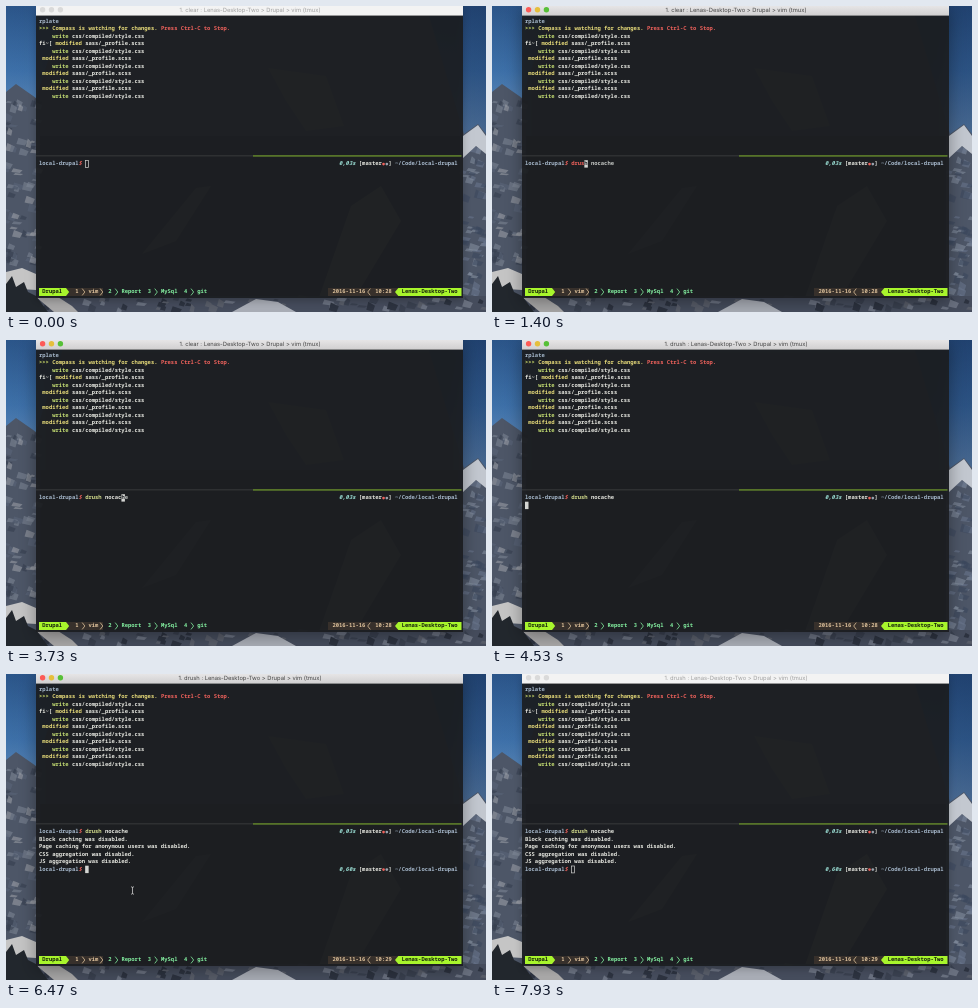
Animation, 480 px wide and 306 px high, one loop 7.99 s. Source, as an HTML page with a canvas:

```html
<!DOCTYPE html>
<html>
<head>
<meta charset="utf-8">
<style>
html, body { margin: 0; width: 100%; height: 100%; overflow: hidden; background: #1b1c20; }
canvas { display: block; width: 480px; height: 306px; }
</style>
</head>
<body>
<canvas id="stage"></canvas>
<script>
const LOOP = 7990, CW = 3.297, LEFT = 33, ROW = 7.5;
const HOST = 'Lenas-Desktop-Two';
const WHITE = '#e6e7e0', LIME = '#a8f52c', MINT = '#83efa0', TAN = '#dcc09a',
      YELLOW = '#e8dc7a', RED = '#f0625c', BLUE = '#a6b8cb', CYAN = '#9ce0d6';
const canvas = document.getElementById('stage');
const ctx = canvas.getContext('2d');
const ratio = window.devicePixelRatio || 1;
canvas.width = 480 * ratio;
canvas.height = 306 * ratio;

const colX = col => LEFT + col * CW;
const rowY = row => 15.4 + row * ROW;

function rect(x, y, w, h, color) {
  ctx.fillStyle = color;
  ctx.fillRect(x, y, w, h);
}

function poly(color, ...p) {
  ctx.fillStyle = color;
  ctx.beginPath();
  for (let i = 0; i < p.length; i += 2) ctx.lineTo(p[i], p[i + 1]);
  ctx.fill();
}

function gradient(x1, y1, ...colors) {
  const g = ctx.createLinearGradient(0, 0, x1, y1);
  colors.forEach((c, i) => g.addColorStop(i / (colors.length - 1), c));
  return g;
}

// Writes text on the terminal grid and returns the next column.
function put(col, row, text, color = WHITE, style = '600') {
  ctx.font = style + ' 5.495px "Noto Sans Mono", "DejaVu Sans Mono", monospace';
  ctx.textAlign = 'left';
  ctx.fillStyle = color;
  ctx.fillText(text, colX(col), rowY(row));
  return col + text.length;
}

function seeded(seed) {
  return () => (seed = (seed * 16807) % 2147483647) / 2147483647;
}

const rnd = seeded(41);

// Scatters soft rock facets over a box.
function rocks(count, x, y, w, h, tones) {
  for (let i = 0; i < count; i++) {
    const px = x + rnd() * w, py = y + rnd() * h;
    const dx = 3 + rnd() * 7, dy = 2 + rnd() * 8;
    poly(tones[i % tones.length], px, py, px + dx, py + dy * 0.4, px + dx * 0.7, py + dy, px - 2, py + dy * 0.8);
  }
}

function wallpaper() {
  rect(0, 0, 480, 306, gradient(0, 130, '#2b5589', '#3d70a9', '#6d95bf'));
  rect(0, 0, 480, 130, gradient(480, 0, 'rgba(16,36,72,0)', 'rgba(16,36,72,.4)'));
  // mountain side and its brighter faces
  poly('#4d5667', 0, 86, 10, 78, 30, 92, 60, 0, 420, 0, 458, 128, 472, 118, 480, 128, 480, 306, 0, 306);
  rect(34, 130, 420, 176, '#33363d');
  poly('#777468', 262, 62, 320, 70, 338, 120, 300, 125, 280, 95);
  poly('#6a675f', 136, 248, 190, 182, 205, 180, 170, 235);
  poly('#777468', 310, 300, 345, 200, 375, 180, 395, 215, 350, 290);
  rocks(70, -3, 90, 34, 165, ['#8089988c', '#333c4c8c', '#a0a4ab8c', '#5b667a8c']);
  rocks(55, 455, 136, 24, 160, ['#8791a28c', '#3b475d8c', '#6b788f8c']);
  poly('#c3c8d0', 457, 130, 472, 119, 480, 130, 480, 148, 470, 140, 457, 152);
  rect(30, 290, 450, 16, '#454c5c');
  rocks(60, 30, 289, 450, 13, ['#2c323f', '#69707f', '#39404f', '#575c68']);
  poly('#a9a8a8', 30, 291, 52, 291, 66, 300, 72, 306, 48, 306);
  poly('#a9adb6', 226, 306, 250, 293, 272, 296, 290, 306);
  // snow bank and trees in the corner
  poly('#c5c5c5', 0, 266, 16, 262, 30, 268, 30, 284, 0, 282);
  poly('#22272d', 0, 278, 6, 270, 10, 281, 18, 276, 22, 286, 30, 290, 42, 306, 0, 306);
}

function titleBar(focused, command) {
  rect(30, 0, 427, 9.6, focused ? gradient(0, 9.6, '#e6e5e6', '#d0cfd0') : '#f3f3f3');
  rect(30, 9.4, 427, 0.4, '#8a8a8a');
  const lights = focused ? ['#fc5b57', '#e5bf3c', '#57c038'] : ['#dadada', '#dadada', '#dadada'];
  lights.forEach((color, i) => {
    ctx.fillStyle = color;
    ctx.beginPath();
    ctx.arc(36.6 + i * 8.9, 3.8, 2.7, 0, 7);
    ctx.fill();
  });
  ctx.font = '5.8px Inter, Roboto, sans-serif';
  ctx.textAlign = 'center';
  ctx.fillStyle = focused ? '#454545' : '#a0a0a0';
  ctx.fillText(`1. ${command} : ${HOST} > Drupal > vim (tmux)`, 244, 4.4);
}

function compassPane() {
  put(0, 0, 'rplate', BLUE);
  put(0, 1, '>>>', '#d3e36c');
  put(4, 1, 'Compass is watching for changes.', YELLOW);
  put(37, 1, 'Press Ctrl-C to Stop.', RED);
  for (let row = 2; row <= 10; row++) {
    if (row % 2 === 0) {
      put(4, row, 'write', '#c3dc72');
      put(10, row, 'css/compiled/style.css');
    } else {
      const col = row === 3 ? 5 : 1;
      if (row === 3) put(0, row, 'fi~[');
      put(col, row, 'modified', YELLOW, '700');
      put(col + 9, row, 'sass/_profile.scss');
    }
  }
  rect(30, 149.6, 217, 0.6, '#4a4b4d');
  rect(247, 149.5, 208.5, 0.9, '#8fc732');
}

function prompt(row, seconds) {
  put(0, row, 'local-drupal', BLUE);
  put(12, row, '$', RED, 'italic 700');
  put(91, row, seconds, CYAN, 'italic 700');
  put(97, row, '[master', WHITE, '700');
  [RED, '#9aa3ae'].forEach((color, i) => {
    ctx.fillStyle = color;
    ctx.beginPath();
    ctx.arc(colX(104.5 + i), rowY(row) + 0.2, 1.35, 0, 7);
    ctx.fill();
  });
  put(106, row, ']', WHITE, '700');
  put(108, row, '~/Code/local-drupal', BLUE);
}

function cursor(col, row, focused, under = '') {
  const x = colX(col), y = rowY(row) - 3.7;
  if (!focused) {
    ctx.strokeStyle = '#d0d0ce';
    ctx.lineWidth = 0.7;
    ctx.strokeRect(x + 0.2, y + 0.3, CW - 0.2, 6.9);
    return;
  }
  rect(x, y, CW + 0.2, 7.4, '#d4d5d2');
  put(col, row, under, '#202226');
}

function chevron(x, dir, color) {
  ctx.strokeStyle = color;
  ctx.lineWidth = 0.8;
  ctx.beginPath();
  ctx.moveTo(x - dir * 1.3, 282.6);
  ctx.lineTo(x + dir * 1.3, 286);
  ctx.lineTo(x - dir * 1.3, 289.4);
  ctx.stroke();
}

function statusBar(clock) {
  rect(60, 282, 37, 8, '#37302b');
  rect(322, 282, 70, 8, '#37302b');
  poly(LIME, 33, 282, 60, 282, 63.2, 286, 60, 290, 33, 290);
  poly(LIME, 455.5, 282, 392.3, 282, 389, 286, 392.3, 290, 455.5, 290);
  put(1, 36, 'Drupal', '#15200c', '700');
  put(110, 36, HOST, '#15200c', '700');
  [[11, '1', 'vim'], [21, '2', 'Report'], [33, '3', 'MySql'], [44, '4', 'git']].forEach(([col, n, name], i) => {
    const color = i ? MINT : TAN;
    put(col, 36, n, color);
    chevron(colX(col + 2.5), 1, color);
    put(col + 4, 36, name, color, '700');
  });
  chevron(95.5, 1, TAN);
  put(89, 36, '2016-11-16', TAN);
  chevron(363, -1, TAN);
  put(102, 36, clock, TAN);
}

// Each entry: time, number of characters kept, text added.
const KEYS = [
  [930, 0, 'd'], [1070, 1, 'r'], [1200, 2, 'u'], [1330, 3, 's'], [1470, 4, 'h'],
  [1670, 5, ' '], [1870, 6, 'n'], [2070, 7, 'o'], [2330, 8, ' '], [2600, 9, 'c'],
  [2930, 9, ''], [3070, 8, ''], [3330, 8, 'c'], [3470, 9, 'a'], [3670, 10, 'c'],
  [3800, 11, 'h'], [3930, 12, 'e']
];
const COMMAND = 'drush nocache', ENTER = 4200, DONE = 4800;
const OUTPUT = ['Block caching was disabled.', 'Page caching for anonymous users was disabled.',
  'CSS aggregation was disabled.', 'JS aggregation was disabled.'];

function shellPane(time, focused) {
  let typed = '';
  for (const [at, keep, added] of KEYS) {
    if (time >= at) typed = typed.slice(0, keep) + added;
  }
  prompt(19, '0,03s');
  const rest = typed && COMMAND.startsWith(typed) ? COMMAND.slice(typed.length) : '';
  const end = put(14, 19, typed.slice(0, 5), typed.length < 5 ? RED : '#d3dc8c');
  put(end, 19, typed.slice(5));
  put(14 + typed.length, 19, rest, '#c5c8c5');
  if (time < ENTER) {
    cursor(14 + typed.length, 19, focused, rest[0]);
  } else if (time < DONE - 70) {
    cursor(0, 20, focused);
  } else {
    OUTPUT.forEach((line, i) => put(0, 20 + i, line));
    if (time < DONE) return cursor(0, 24, focused);
    prompt(24, '0,60s');
    cursor(14, 24, focused);
  }
}

function mouse(time) {
  if (time < 5000 || time > 7400) return;
  const ease = (a, b) => {
    const k = Math.min(1, Math.max(0, (time - a) / (b - a)));
    return k * k * (3 - 2 * k);
  };
  const away = ease(6750, 7400);
  const x = 203.5 - 77 * ease(5450, 6350) + 150 * away;
  const y = 229.5 - 13 * ease(5450, 6350) - 225 * away;
  ctx.strokeStyle = '#d6d6d6';
  ctx.lineWidth = 0.75;
  ctx.beginPath();
  for (const s of [-1, 1]) {
    ctx.moveTo(x - 1.4, y + s * 3.7);
    ctx.quadraticCurveTo(x, y + s * 3.7, x, y + s * 2.8);
    ctx.quadraticCurveTo(x, y + s * 3.7, x + 1.4, y + s * 3.7);
  }
  ctx.moveTo(x, y - 3);
  ctx.lineTo(x, y + 3);
  ctx.stroke();
}

// The still backdrop is painted once and kept.
function paintBackdrop() {
  ctx.setTransform(ratio, 0, 0, ratio, 0, 0);
  wallpaper();
  const copy = document.createElement('canvas');
  copy.width = canvas.width;
  copy.height = canvas.height;
  copy.getContext('2d').drawImage(canvas, 0, 0);
  return copy;
}

const backdrop = paintBackdrop();

function draw(now) {
  const time = now % LOOP;
  const focused = time >= 470 && time < 7470;
  ctx.textBaseline = 'middle';
  ctx.textRendering = 'geometricPrecision';
  ctx.drawImage(backdrop, 0, 0, 480, 306);
  ctx.save();
  ctx.shadowColor = focused ? 'rgba(0,0,0,.4)' : 'rgba(0,0,0,.25)';
  ctx.shadowBlur = (focused ? 16 : 8) * ratio;
  ctx.shadowOffsetY = 3 * ratio;
  rect(30, 0, 427, 292, 'rgba(28,30,33,.92)');
  ctx.restore();
  titleBar(focused, time < ENTER ? 'clear' : 'drush');
  compassPane();
  shellPane(time, focused);
  statusBar(time < 4870 ? '10:28' : '10:29');
  mouse(time);
  requestAnimationFrame(() => draw(performance.now()));
}
draw(0);
</script>
</body>
</html>
```
